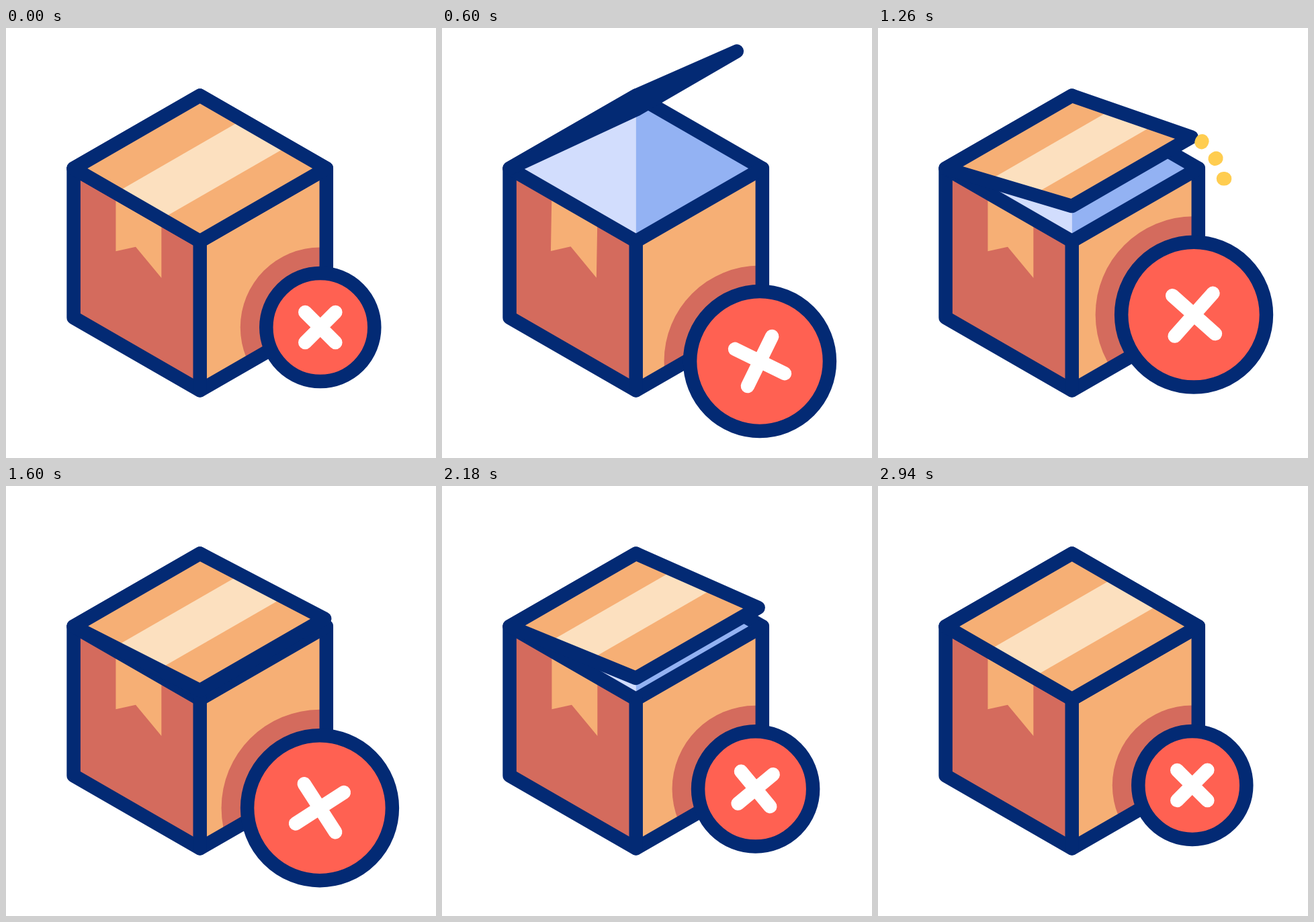
These frames come from a looping animation (640 px wide and 640 px high, 3 s). An HTML page with a canvas:

```html
<!DOCTYPE html>
<html lang="en">
<head>
<meta charset="utf-8">
<title>Parcel</title>
<style>
html, body { margin: 0; width: 100%; height: 100%; overflow: hidden; background: #fff; }
canvas { display: block; width: 640px; height: 640px; }
</style>
</head>
<body>
<canvas id="stage" width="640" height="640"></canvas>
<script>
const ctx = document.getElementById('stage').getContext('2d');
const LOOP = 3000, LINE = 20.5, RAD = Math.PI / 180;
const NAVY = '#032a74', ORANGE = '#f6af75', BRICK = '#d46b5d', TAPE = '#fce0bf',
      RED = '#ff6152', PALE = '#d2ddfd', BLUE = '#93b2f3', YELLOW = '#ffcd50';

// An isometric box: centre of its top, half width, half height of the top, depth
const CX = 288.7, CY = 209, W = 188.1, H = 108.3, DEPTH = 222;
const down = p => [p[0], p[1] + DEPTH];
const left = [CX - W, CY], right = [CX + W, CY], back = [CX, CY - H], front = [CX, CY + H];
const TAPE_FROM = 0.334, TAPE_TO = 0.695;

const mix = (a, b, f) => [a[0] + (b[0] - a[0]) * f, a[1] + (b[1] - a[1]) * f];

// Eased step from 0 to 1, and a bump that eases up to 1 and back to 0
function rise(t, from, to) {
  const p = Math.max(0, Math.min(1, (t - from) / (to - from)));
  return p * p * (3 - 2 * p);
}
const bump = (t, from, peak, to) => rise(t, from, peak) - rise(t, peak, to);

function trace(points, close) {
  ctx.beginPath();
  points.forEach(p => ctx.lineTo(p[0], p[1]));
  if (close) ctx.closePath();
}

function fill(points, color) {
  trace(points, true);
  ctx.fillStyle = color;
  ctx.fill();
}

function stroke(points, color, close) {
  trace(points, close);
  ctx.strokeStyle = color;
  ctx.stroke();
}

function disc(x, y, r, color) {
  ctx.beginPath();
  ctx.arc(x, y, r, 0, Math.PI * 2);
  ctx.fillStyle = color;
  ctx.fill();
}

function badgeAt(t) {
  const dips = bump(t, 0, 600, 1200) + bump(t, 1200, 1785, 2450);
  return {
    x: 467.8 + 5.6 * bump(t, 100, 700, 1960) - 2.4 * bump(t, 700, 1960, 2400),
    y: 445.5 + 50.5 * dips - 21 * bump(t, 600, 1200, 1785) - 19.8 * bump(t, 1785, 2450, 2960),
    r: 80.5 + 27.4 * (rise(t, 0, 790) - rise(t, 1600, 2400)),
    turn: 20 * (bump(t, 700, 1960, 2430) - bump(t, 10, 700, 1960)) - 12.2 * bump(t, 1960, 2430, 2960)
  };
}

function drawBox(t, badge) {
  const dy = -18.4 * bump(t, 0, 300, 600);
  ctx.save();
  ctx.translate(0, dy);
  fill([left, front, down(front), down(left)], BRICK);
  fill([front, right, down(right), down(front)], ORANGE);
  drawRibbon(bump(t, 560, 860, 1200));

  ctx.save();
  trace([front, right, down(right), down(front)], true);
  ctx.clip();
  disc(badge.x, badge.y - dy, badge.r + 38.5, BRICK);
  ctx.restore();

  fill([left, back, front], PALE);
  fill([back, right, front], BLUE);
  stroke([left, back, right, down(right), down(front), down(left)], NAVY, true);
  stroke([left, front, right], NAVY);
  stroke([front, down(front)], NAVY);
  drawLid(t);
  ctx.restore();
}

function drawRibbon(swing) {
  const a = mix(left, front, TAPE_FROM), b = mix(left, front, TAPE_TO);
  const hang = (x, y) => [x - 29 * swing, y - 6.5 * swing];
  fill([a, b, hang(b[0], 372), hang(193, 325.7), hang(a[0], 332.3)], ORANGE);
}

function drawLid(t) {
  const wide = rise(t, 99, 720) - rise(t, 880, 1440);
  const ajar = 0.212 * bump(t, 1440, 1900, 2650);
  const open = wide + ajar, slide = 1 - 0.55 * ajar;
  const near = [CX, front[1] - 2 * H * open];
  const tip = [right[0] - 42 * open, CY - 193 * open];
  const from = TAPE_FROM * slide, to = TAPE_TO * slide;
  fill([left, back, tip, near], ORANGE);
  fill([mix(left, near, from), mix(back, tip, from), mix(back, tip, to), mix(left, near, to)], TAPE);
  stroke([left, back, tip, near], NAVY, true);
}

// Three short rays thrown off the corner as the lid comes down
function drawRays(t) {
  if (t < 1240 || t >= 1600) return;
  const head = 42 * rise(t, 1230, 1460), tail = 42 * rise(t, 1370, 1600);
  for (let i = -1; i <= 1; i++) {
    const place = (-31 + 16.5 * i) * RAD, aim = (-31 + 33 * i) * RAD;
    const x = 406.5 + 111 * Math.cos(place), y = 252 + 111 * Math.sin(place);
    const along = d => [x + d * Math.cos(aim), y + d * Math.sin(aim)];
    stroke([along(tail), along(head)], YELLOW);
  }
}

function drawBadge({ x, y, r, turn }) {
  ctx.save();
  ctx.translate(x, y);
  disc(0, 0, r, RED);
  ctx.strokeStyle = NAVY;
  ctx.stroke();
  ctx.rotate(turn * RAD);
  const h = 0.28 * r;
  stroke([[-h, -h], [h, h]], '#fff');
  stroke([[h, -h], [-h, h]], '#fff');
  ctx.restore();
}

function draw(t) {
  ctx.fillStyle = '#fff';
  ctx.fillRect(0, 0, 640, 640);
  ctx.lineWidth = LINE;
  ctx.lineCap = ctx.lineJoin = 'round';
  const badge = badgeAt(t);
  drawBox(t, badge);
  drawRays(t);
  drawBadge(badge);
}

const start = performance.now();
function tick() {
  draw((performance.now() - start) % LOOP);
  requestAnimationFrame(tick);
}
tick();
</script>
</body>
</html>
```
